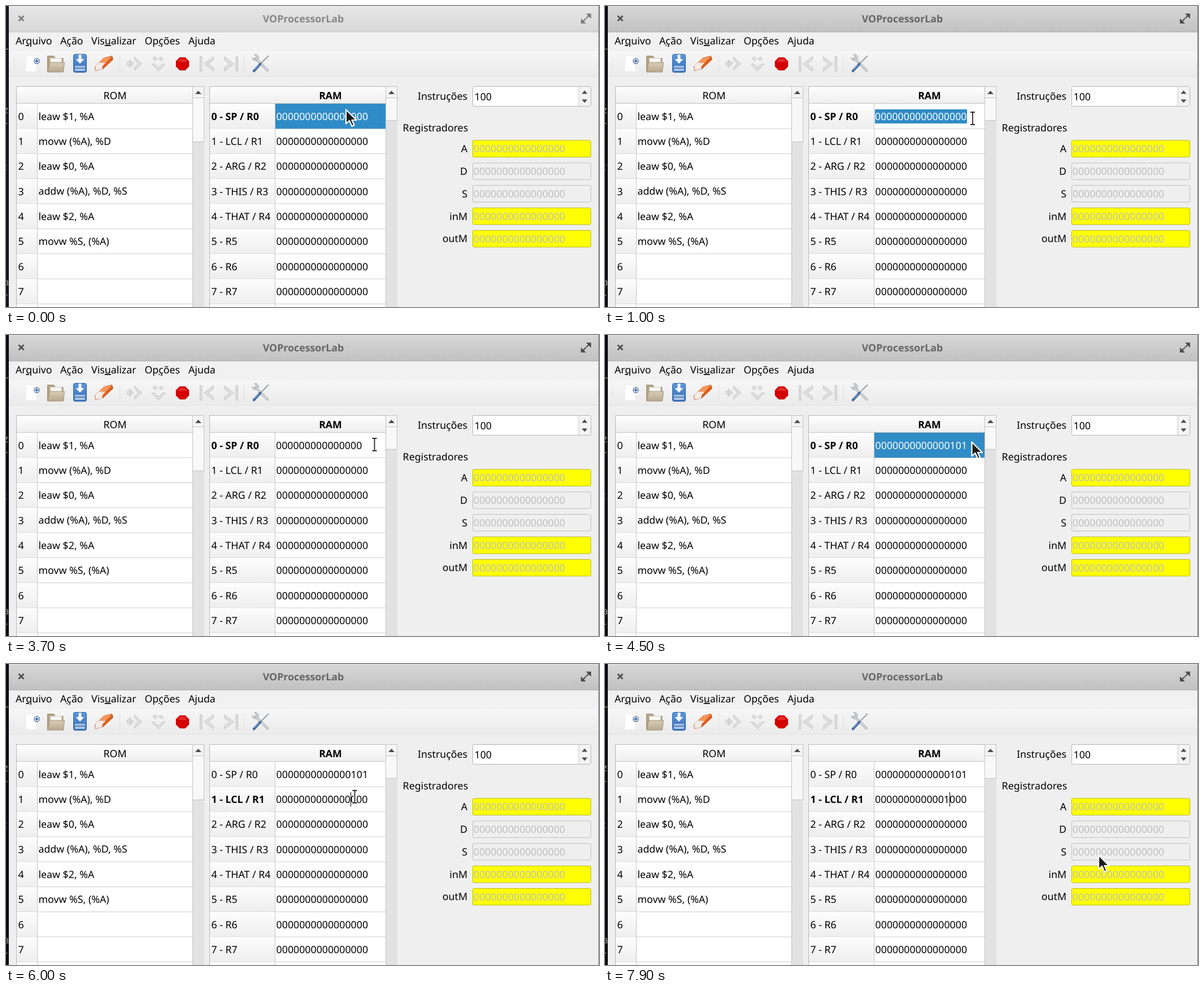
These frames come from a looping animation (1050x533 px, 8 s). An HTML page:

```html
<!DOCTYPE html>
<html lang="pt">
<head>
<meta charset="utf-8">
<style>
html, body { margin: 0; width: 100%; height: 100%; overflow: hidden; background: #efefef; }
svg { display: block; width: 1050px; height: 533px; }
text { font: 17.76px "Noto Sans", "Open Sans", sans-serif; white-space: pre; text-rendering: geometricPrecision; }
.b { font-weight: 700; }
.u { text-decoration: underline; text-decoration-skip-ink: none; }
</style>
</head>
<body>
<svg viewBox="0 0 1050 533">
  <defs id="defs"></defs>
  <g id="titlebar"></g>
  <g id="window"></g>
  <g id="memory"></g>
  <g id="pointer"></g>
</svg>
<script>
const LOOP = 8000, ROW = 44.33, TOP = 173, DIGIT = 10.16;
const zeros = n => '0'.repeat(n);
const byId = id => document.getElementById(id);

const rect = (x, y, w, h, fill, extra = '') =>
  `<rect x="${x}" y="${y}" width="${w}" height="${h}" fill="${fill}" ${extra}/>`;
const box = (x, y, w, h, fill, stroke, r = 2) =>
  rect(x + .5, y + .5, w - 1, h - 1, fill, `stroke="${stroke}" rx="${r}"`);
const path = (d, fill, stroke = 'none', width = 1, extra = '') =>
  `<path d="${d}" fill="${fill}" stroke="${stroke}" stroke-width="${width}" ${extra}/>`;
const text = (x, y, s, fill = '#000', extra = '') =>
  `<text x="${x}" y="${y}" fill="${fill}" ${extra}>${s}</text>`;
const right = 'text-anchor="end"', middle = 'text-anchor="middle"';
const gradient = (id, from, to) =>
  `<linearGradient id="${id}" x2="0" y2="1"><stop stop-color="${from}"/><stop offset="1" stop-color="${to}"/></linearGradient>`;
const at = (x, y, s, turn = 0) => `<g transform="translate(${x} ${y}) rotate(${turn})">${s}</g>`;

byId('defs').innerHTML =
  gradient('activeBar', '#d7d7d7', '#c1c1c1') + gradient('idleBar', '#e6e6e6', '#d8d8d8') +
  gradient('tools', '#f6f6f6', '#ebebeb') + gradient('head', '#fdfdfd', '#eeeeee') +
  gradient('blue', '#5b97dd', '#3a70b8') + gradient('folder', '#d9cdb8', '#b8a88c');

// Title bar and the sliver of another window behind it
function titleBar(active) {
  const ink = active ? '#4c4c4c' : '#7b7b7b';
  const behind = [[22, 'J'], [77, 'L'], [190, 'z'], [217, 'r'], [291, 't', '#6c62c4'], [495, 'a'], [521, 'r']];
  return rect(0, 0, 6, 533, active ? '#0d0d12' : '#15151b') +
    behind.map(([y, s, c = '#8c8c8c']) => text(-4.5, y, s, c)).join('') +
    rect(5, 0, 1045, 533, '#efefef') +
    rect(5, 0, 1044, 46, `url(#${active ? 'activeBar' : 'idleBar'})`) +
    rect(5, 0, 1044, 1, active ? '#e4e4e4' : '#f2f2f2') +
    rect(5, 45.5, 1044, 1, active ? '#a8a8a8' : '#c4c4c4') +
    path('M22.5 17.5l9 9m0-9l-9 9', 'none', ink, 2.6) +
    text(526.5, 29, 'VOProcessorLab', active ? '#666666' : '#878787', `class="b" ${middle}`) +
    path('M1027 13.500h9v9zM1018 22v9h9z', ink) +
    path('M1034 15.500l-7 6.500M1020 29l6.500-6.500', 'none', ink, 2);
}

function menuBar() {
  const items = [[17, 'Ar', 'q', 'uivo'], [96, 'A', 'ç', 'ão'], [151, 'Vis', 'u', 'alizar'], [245.5, 'Op', 'ç', 'ões'], [323, 'A', 'j', 'uda']];
  return rect(5, 47, 1044, 33, '#f1f1f1') + rect(5, 80, 1044, 44, 'url(#tools)') + rect(5, 124, 1044, 1, '#e2e2e2') +
    items.map(([x, a, key, z]) => text(x, 68, `${a}<tspan class="u">${key}</tspan>${z}`)).join('');
}

function toolBar() {
  const pale = d => path(d, '#dedede', '#c6c6c6', 1, 'stroke-linejoin="round"');
  const octagon = Array.from({ length: 8 }, (_, i) => {
    const a = (i + .5) * Math.PI / 4;
    return `${(312.5 + 12.6 * Math.cos(a)).toFixed(1)} ${(102.5 + 12.6 * Math.sin(a)).toFixed(1)}`;
  }).join('L');
  const newFile = rect(35, 88, 19, 28, '#fff', 'stroke="#ececec"') +
    '<circle cx="54.5" cy="97.5" r="4.6" fill="#fff" stroke="#3e6294" stroke-width="1.2"/>' +
    path('M54.5 94.500v6M51.500 97.500h6', 'none', '#3465a4', 2);
  const folder = path('M73.500 116V88.500h11l3 4h13.500v23z', '#b5a486', '#9b8b70') +
    box(78, 92, 21, 18, '#f6f6f4', '#d4d0c8', 1) +
    path('M73.500 117l4-17h26l-2 17z', 'url(#folder)', '#a09074');
  const save = box(119, 85, 24, 33, 'url(#blue)', '#3465a4', 3) + rect(122, 106, 18, 9, '#a9c5e8') +
    rect(122, 109, 18, 2, '#5c83b8') +
    path('M128.500 86h5v8h5l-7.500 8-7.500-8h5z', '#fff');
  const eraser = path('M157.500 107l16-15 14-3.500 2 6-18 17-13 3z', '#dd5f1c', '#c54d12', 1, 'stroke-linejoin="round"') +
    path('M158 106l16-14.500 14-2.500-17 17z', '#f8965a') +
    path('M158 106l6-5.500 12 .5-5 5-1 6-11 2z', '#f5ebe5', '#d9c9bf');
  const step = pale('M-13-3h5v6h-5z') + pale('M-9-7l8 7-8 7v-4l3-3-3-3z') + pale('M0-12l13 12L0 12V7l7-7-7-7z');
  const jump = pale('M-10-10l4-3 4 4-4 4zM1-10l5-2 2 5-5 1z') + pale('M-12 0h5L0 7l7-7h5L0 13z');
  const bound = pale('M-13-13h3.500v26h-3.500z') + pale('M11-13L-6 0l17 13V7L2 0l9-7z');
  const stop = path(`M${octagon}z`, '#d40000', '#dedede', 1.6, 'paint-order="stroke"') +
    path('M304 99l4.500-5.500h8L321 99z', '#e22a2a');
  const tools = path('M442 93l21 21', 'none', '#9a9fa3', 4, 'stroke-linecap="round"') +
    path('M442 93l21 21', 'none', '#e0e2e4', 2.2, 'stroke-linecap="round"') +
    path('M436 91l4 4 4-4-4-5c5-1 8 3 7 7l-4 4c-4 0-7-2-7-6z', '#d2d5d7', '#9a9fa3') +
    path('M465 88l-16 16', 'none', '#9a9fa3', 2) +
    path('M450 103l-11 12', 'none', '#45699f', 4.5, 'stroke-linecap="round"') +
    path('M448 104l-8 8.500', 'none', '#87abd8', 1.5);
  const separator = x => rect(x, 88, 1, 29, '#dfdfdf');
  return path('M14.500 95v14', 'none', '#d5d5d5', 1, 'stroke-dasharray="2 2"') +
    newFile + folder + save + eraser + separator(201) + at(227.5, 102, step) + at(270, 102.5, jump) +
    stop + at(356.5, 102.5, bound) + at(397.5, 102.5, bound, 180) + separator(421) + tools;
}

const tableFrame = (x, split, title, thumbEnd, cls = '') => {
  const bar = x + 311;
  return box(x, 142, 333, 400, '#fff', '#b7b7b7', 0) +
    rect(x + 1, 143, 311, 30, 'url(#head)') +
    rect(x + 1, 172, 311, 1, '#c3c3c3') +
    text((split + bar) / 2 + .5, 164.5, title, '#000', `${middle} ${cls}`) +
    rect(bar + 1, 143, 21, 390, '#e2e2e2') + rect(bar + 1, 143, 1, 390, '#c4c4c4') +
    box(bar + 1, 142, 21, 21, '#f5f5f5', '#c2c2c2', 0) +
    box(bar + 1, 162, 21, thumbEnd - 162, '#f8f8f8', '#c2c2c2', 0) +
    path(`M${bar + 6} 156h11l-5.500-6z`, '#4c4c4c');
};

const rowHeader = (x, w, i, label, bold) => {
  const y = TOP + i * ROW;
  return rect(x + 1, y, w, ROW, 'url(#head)') + rect(x + w, y, 1, ROW, '#c6c6c6') +
    rect(x + 1, y + ROW - .6, 311, 1, '#cecece') +
    text(x + 3.4, y + 28.8, label, '#000', bold ? 'class="b"' : '');
};

function romTable() {
  const code = ['leaw $1, %A', 'movw (%A), %D', 'leaw $0, %A', 'addw (%A), %D, %S', 'leaw $2, %A', 'movw %S, (%A)', '', '', ''];
  return tableFrame(18, 56, 'ROM', 241) +
    code.map((s, i) => rowHeader(18, 37, i, i) + text(57.5, TOP + i * ROW + 28.5, s)).join('');
}

function registers() {
  const list = [['A', 1], ['D', 0], ['S', 0], ['inM', 1], ['outM', 1]];
  return text(817, 166, 'Instruções', '#000', right) +
    box(826, 142, 210, 36, '#fff', '#b4b4b4') + rect(1014, 143, 21, 34, '#f4f4f4') + rect(1014, 143, 1, 34, '#c6c6c6') +
    path('M1019.500 155.500h10l-5-6zM1019.500 165.500h10l-5 6z', '#4c4c4c') +
    text(829.5, 166.5, '100') + text(702.6, 222, 'Registradores') +
    list.map(([name, lit], i) => {
      const y = 237.5 + i * 39.85;
      return text(817, y + 21.5, name, '#000', right) +
        box(826, y, 210, 30.5, lit ? '#ffff00' : '#efefef', lit ? '#b9b914' : '#bdbdbd') +
        text(827.8, y + 21.7, zeros(16), '#bebebe');
    }).join('') + rect(1049, 0, 1, 533, '#77777a');
}

// RAM table with its cell editor
function ramTable(s) {
  const names = ['SP / R0', 'LCL / R1', 'ARG / R2', 'THIS / R3', 'THAT / R4', 'R5', 'R6', 'R7', 'R8'];
  return tableFrame(360, 477, 'RAM', 203, 'class="b"') + names.map((name, i) => {
    const y = TOP + i * ROW, current = i === s.row, editing = current && s.edit;
    const blue = current && (!s.edit || s.marked);
    const x = editing ? 478 : 478.6;
    let out = rowHeader(360, 116, i, `${i} - ${name}`, current);
    if (current && !editing) out += rect(477, y, 195, ROW, '#308cc6');
    if (editing && s.marked) out += rect(478, y + 10, 163, 25, '#308cc6');
    out += text(x, y + 28.7, s.values[i] ?? zeros(16), blue ? '#fff' : '#000');
    if (editing && s.caret >= 0) out += rect(Math.round(478 + s.caret * DIGIT - .3), y + 9.7, 1, 25.5, '#000');
    return out;
  }).join('');
}

function pointer({ beam, x, y }) {
  if (!beam) return at(x, y, path('M0 0V25L6 19.500 10.500 29.500 14.500 27.500 10.500 18.500H18.500z', '#1c1c1c', '#fff', 2.2, 'stroke-linejoin="round"'));
  const d = 'M-4-11h3l1 1 1-1h3M0-10V10M-4 11h3l1-1 1 1h3';
  return at(x, y, path(d, 'none', '#fff', 4.4) + path(d, 'none', '#2a2a2a', 1.8));
}

// Each entry changes part of the state at its time (ms)
const entered = zeros(13) + '101';
const timeline = [
  [0, { active: false, row: 0, edit: false, marked: false, caret: -1, values: [], beam: false, x: 602, y: 183.5 }],
  [200, { x: 604, y: 187 }],
  [300, { active: true, x: 607, y: 190 }],
  [400, { x: 608, y: 191.5 }],
  [600, { edit: true, marked: true }],
  [700, { beam: true, x: 616, y: 200 }],
  [800, { x: 630, y: 200 }],
  [900, { x: 644, y: 200 }],
  [1000, { x: 651, y: 199 }],
  [1100, { x: 652.5, y: 194 }],
  [1200, { marked: false }],
  [1700, { caret: 16 }],
  [2300, { caret: -1 }],
  [3700, { values: [zeros(15)] }],
  [4100, { values: [zeros(13)], caret: 13 }],
  [4200, { values: [entered], caret: -1 }],
  [4500, { edit: false, beam: false, x: 649.5, y: 189.5 }],
  [5100, { x: 640, y: 203 }],
  [5200, { x: 618, y: 222 }],
  [5300, { row: 1, x: 609.5, y: 227 }],
  [5600, { edit: true, marked: true }],
  [5700, { beam: true, x: 617.5, y: 235 }],
  [6000, { marked: false, caret: 13 }],
  [6200, { caret: -1 }],
  [6600, { values: [entered, zeros(15)], caret: 12 }],
  [6700, { values: [entered, zeros(12) + '1000'], caret: 13 }],
  [7300, { caret: -1, beam: false, x: 690, y: 258 }],
  [7400, { x: 825, y: 318 }],
  [7500, { x: 874, y: 338.5 }],
  [7900, { caret: 13 }]
];

byId('window').innerHTML = menuBar() + toolBar() + romTable() + registers();

let shown = -1;
function frame(now) {
  const t = now % LOOP;
  const count = timeline.filter(([start]) => start <= t).length;
  if (count !== shown) {
    shown = count;
    const state = Object.assign({}, ...timeline.slice(0, count).map(([, change]) => change));
    byId('titlebar').innerHTML = titleBar(state.active);
    byId('memory').innerHTML = ramTable(state);
    byId('pointer').innerHTML = pointer(state);
  }
  requestAnimationFrame(frame);
}
frame(0);
</script>
</body>
</html>
```
